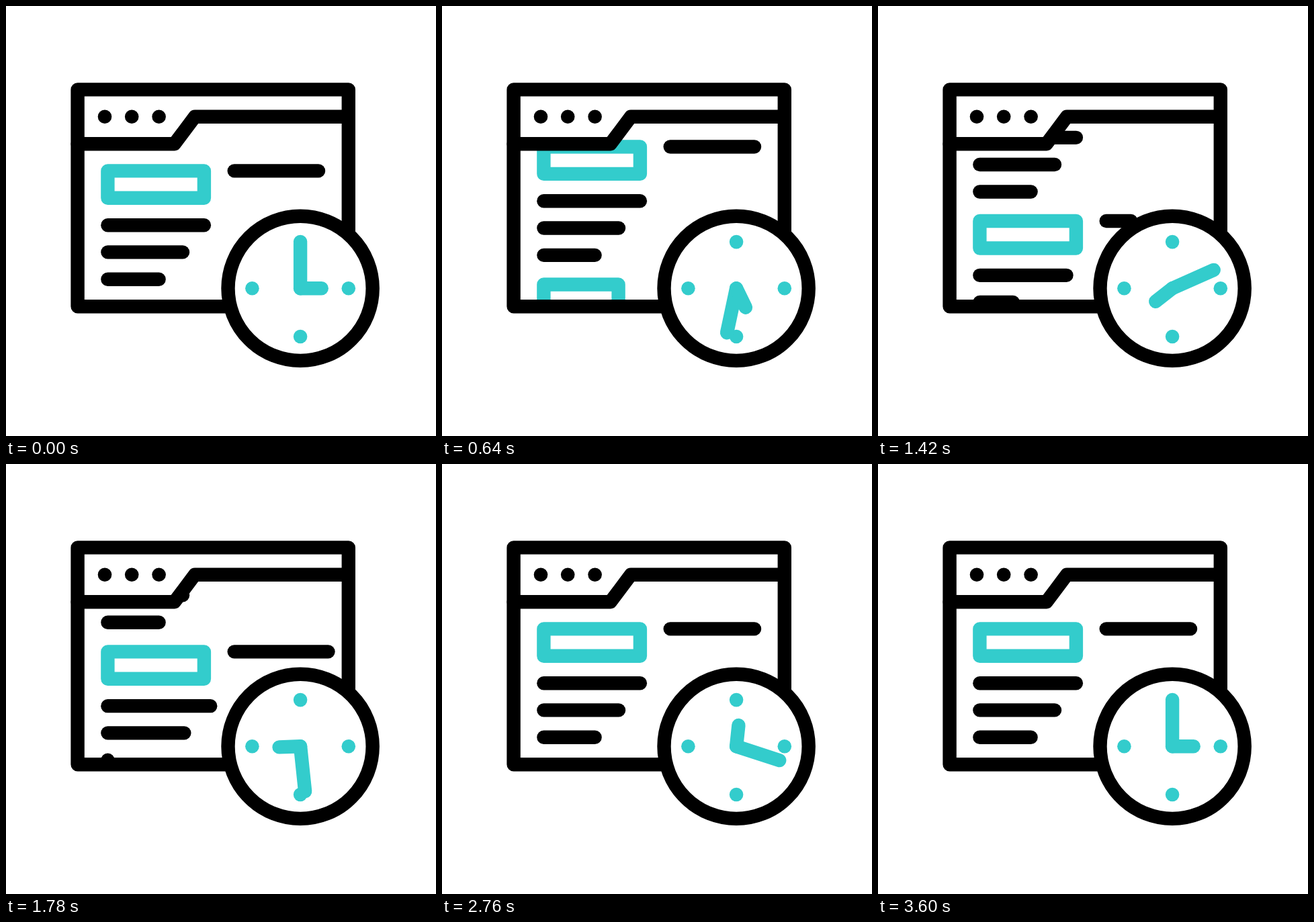
These frames come from a looping animation (640 px wide and 640 px high, 3.62 s). An HTML page:

```html
<!DOCTYPE html>
<html lang="en">
<head>
<meta charset="utf-8">
<title>Browsing time</title>
<style>
  html, body { margin: 0; width: 100%; height: 100%; overflow: hidden; background: #fff; }
  svg { display: block; width: 100vw; height: 100vh; }
  .line { fill: none; stroke: #000; stroke-width: 20.4; stroke-linecap: round; stroke-linejoin: round; }
  .teal { stroke: #3cc; }
  .dots { fill: #3cc; }
</style>
</head>
<body>
<svg viewBox="0 0 640 640">
  <defs>
    <clipPath id="page"><path d="M106.6 205.2H250.8L281 164.8H509.8V447.2H106.6Z"/></clipPath>
  </defs>
  <g clip-path="url(#page)"><g id="scroll" class="line"></g></g>
  <g class="line">
    <rect x="106.6" y="124.4" width="403.2" height="322.8"/>
    <path d="M106.6 205.2H250.8L281 164.8H509.8"/>
  </g>
  <circle cx="147" cy="164.8" r="10.3"/>
  <circle cx="187.2" cy="164.8" r="10.3"/>
  <circle cx="227.6" cy="164.8" r="10.3"/>
  <g transform="translate(438.1 420.3)">
    <circle class="line" r="107.6" style="fill:#fff"/>
    <g class="dots">
      <circle cy="-69.2" r="10.3"/>
      <circle cx="71.7" r="10.3"/>
      <circle cy="71.7" r="10.3"/>
      <circle cx="-71.7" r="10.3"/>
    </g>
    <path id="minute" class="line teal" d="M0 0V-67.4"/>
    <path id="hour" class="line teal" d="M0 0V-31.6"/>
  </g>
</svg>
<script>
  const LOOP = 3620, TURN = 3600, STEP = 20, SCROLL = 2400, SHIFT = 205;
  const $ = id => document.getElementById(id);
  const scroll = $('scroll'), minute = $('minute'), hour = $('hour');

  // grow: [start, peak, settled, overshoot]
  const items = [
    { x: 151.4, y: 245.4, w: 143.5, h: 40.4, grow: [160, 880, 1200, 1.046] },
    { x: 151.4, y: 326.2, w: 143.5, grow: [980, 1600, 1960, 1.13] },
    { x: 151.4, y: 366.4, w: 111.6, grow: [1000, 2000, 2440, 1.165] },
    { x: 339.7, y: 245.4, w: 125.3, grow: [1220, 1820, 2240, 1.13] },
    { x: 151.4, y: 406.8, w: 76.2, grow: [1770, 2370, 2740, 1.13] }
  ];

  function ease(t, from, to) {
    const u = Math.min(1, Math.max(0, (t - from) / (to - from)));
    return u * u * (3 - 2 * u);
  }

  function shape({ x, y, w, h }, dy, k) {
    const r = x + w * k;
    return `M${x} ${y + dy}H${r}` + (h ? `v${h}H${x}Z` : '');
  }

  function addPath(item, dy) {
    const path = document.createElementNS('http://www.w3.org/2000/svg', 'path');
    if (item.h) path.setAttribute('class', 'teal');
    path.setAttribute('d', shape(item, dy, 1));
    scroll.append(path);
    return path;
  }

  for (const item of items) {
    addPath(item, 0);
    item.next = addPath(item, SHIFT);
  }

  function draw(t) {
    scroll.setAttribute('transform', `translate(0 ${-SHIFT * ease(t, 0, SCROLL)})`);
    for (const item of items) {
      const [start, peak, end, over] = item.grow;
      const k = over * ease(t, start, peak) - (over - 1) * ease(t, peak, end);
      item.next.setAttribute('d', shape(item, SHIFT, k));
    }
    minute.setAttribute('transform', `rotate(${1080 * t / TURN})`);
    hour.setAttribute('transform', `rotate(${90 + 360 * t / TURN})`);
  }

  const began = performance.now();
  function tick() {
    const t = (performance.now() - began) % LOOP;
    draw(Math.floor(t / STEP) * STEP);
    requestAnimationFrame(tick);
  }
  tick();
</script>
</body>
</html>
```
